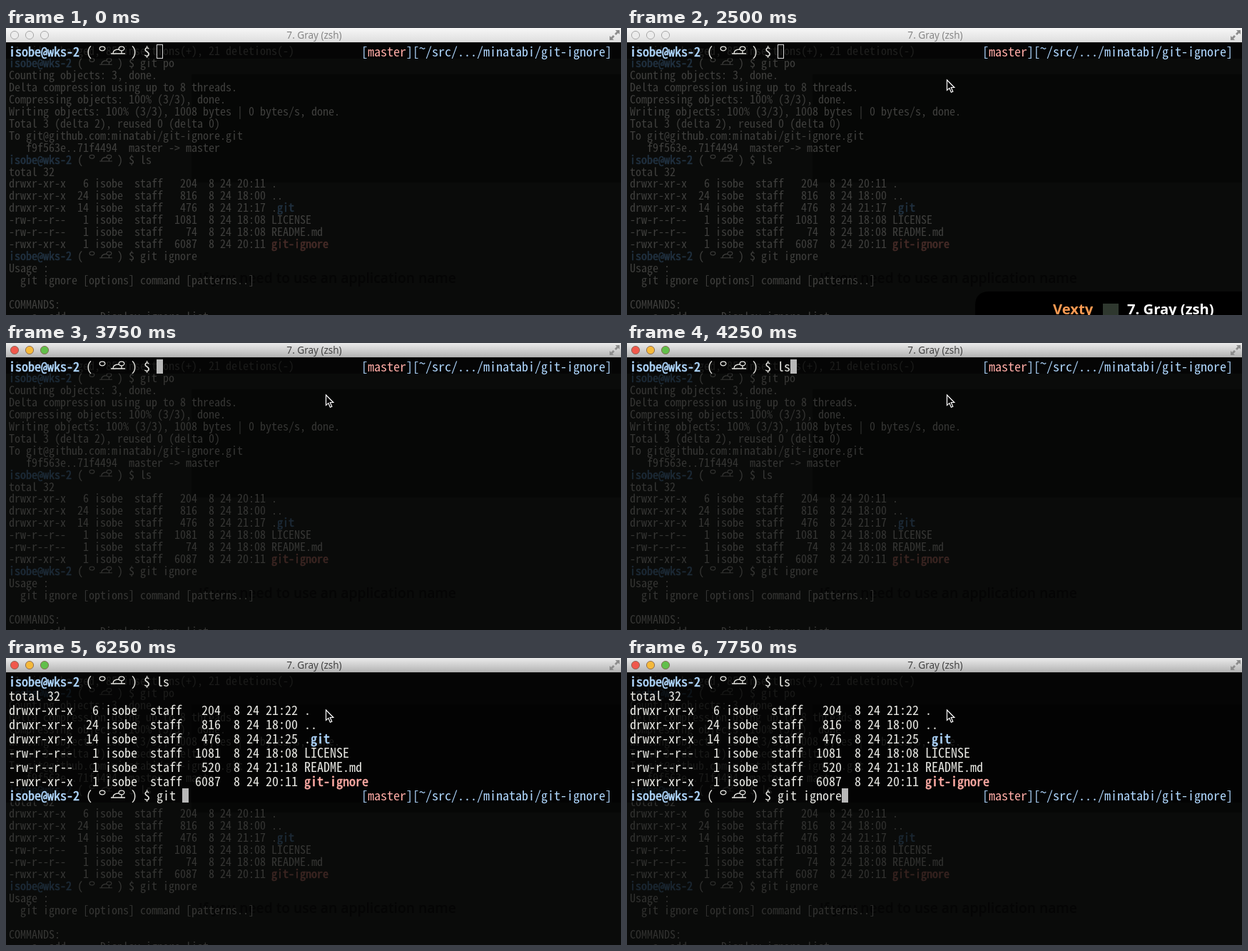
Recreate the animation shown at these times as an HTML page. Size 862 by 403 pixels, loop 8 s.

```html
<!DOCTYPE html>
<html lang="en">
<head>
<meta charset="utf-8">
<title>Terminal session</title>
<style>
html, body { margin: 0; width: 100%; height: 100%; overflow: hidden; background: #0a0b0a; }
svg { display: block; width: 100vw; height: 100vh; }
text { white-space: pre; font-variant-ligatures: none; }
.ui { font-family: "Open Sans", "Noto Sans", sans-serif; }
</style>
</head>
<body>
<svg id="stage" viewBox="0 0 862 403" preserveAspectRatio="none">
  <defs>
    <linearGradient id="barOff" x2="0" y2="1">
      <stop stop-color="#f7f7f7"/><stop offset="1" stop-color="#dedede"/>
    </linearGradient>
    <linearGradient id="barOn" x2="0" y2="1">
      <stop stop-color="#ebebeb"/><stop offset="1" stop-color="#b3b3b3"/>
    </linearGradient>
    <linearGradient id="pillFill" x2="0" y2="1">
      <stop stop-color="#6f9be0"/><stop offset="1" stop-color="#1c49a0"/>
    </linearGradient>
  </defs>
  <rect width="862" height="403" fill="#0a0b0a"/>
  <rect x="260" y="65" width="602" height="152" fill="#060706"/>
  <text class="ui" x="270" y="358" font-size="19.3" font-weight="600" fill="#050505">If you need to use an application name</text>
  <g id="back"></g>
  <rect id="shade" y="21" width="862" height="22" fill="#000" opacity=".5"/>
  <g id="front"></g>
  <g id="bar">
    <rect id="barFill" width="862" height="20"/>
    <path d="M0 20.5H862" stroke="#1a1a1a"/>
    <g id="lights"></g>
    <text id="title" class="ui" x="432" y="14.8" font-size="13.6" text-anchor="middle">7. Gray (zsh)</text>
    <path d="M854 3H860V9L858 7L855 10L853 8L856 5ZM852 17H846V11L848 13L851 10L853 12L850 15Z" fill="#8c8c8c"/>
  </g>
  <g id="switcher" class="ui" font-size="20.2" font-weight="700">
    <path d="M488 403V390Q488 370 508 370H862V403Z" fill="#000"/>
    <rect id="pill" x="659.5" y="384" width="170.5" height="30" rx="8" fill="url(#pillFill)" stroke="#fff" stroke-width="2"/>
    <text x="597" y="401.5" fill="#f79a52">Vexty</text>
    <rect x="667" y="387" width="22" height="22" fill="#2f382f"/>
    <text x="701" y="401.5" fill="#fff">7. Gray (zsh)</text>
  </g>
  <path id="pointer" d="M0 0V14.5L3.4 11.4L5.9 17.2L8.3 16.2L5.8 10.5H10.3Z" fill="#000" stroke="#fff" stroke-width="1.2"/>
</svg>
<script>
const NS = "http://www.w3.org/2000/svg";
const MONO = '"Noto Sans Mono CJK JP", "Noto Sans Mono", "DejaVu Sans Mono", monospace';
const USER = "isobe", HOST = "wks-2", OWNER = "minatabi";
const LOOP = 8000;
const $ = id => document.getElementById(id);
const pen = document.createElement("canvas").getContext("2d");

function add(parent, tag, attrs, content) {
  const node = document.createElementNS(NS, tag);
  for (const key in attrs) node.setAttribute(key, attrs[key]);
  if (content !== undefined) node.textContent = content;
  return parent.appendChild(node);
}

function show(node, on) {
  node.setAttribute("visibility", on ? "visible" : "hidden");
}

// A text grid: half-width cells of a font twice as tall as a cell is wide.
function makeGrid(cell, pitch, base, colors) {
  const size = cell * 2;
  pen.font = `${size}px ${MONO}`;
  const gap = cell - pen.measureText("0".repeat(20)).width / 20;

  function write(g, row, col, str, color = "text", rise = 0) {
    return add(g, "text", {
      x: 4 + col * cell, y: base + row * pitch - rise, fill: colors[color],
      "font-family": MONO, "font-size": size, "letter-spacing": gap
    }, str);
  }

  // Bold is the regular weight thickened by an outline.
  function bold(g, row, col, str, color) {
    const node = write(g, row, col, str, color);
    node.setAttribute("stroke", colors[color]);
    node.setAttribute("stroke-width", 0.6);
  }

  function prompt(g, row, command = "") {
    bold(g, row, 0, `${USER}@${HOST}`, "blue");
    write(g, row, 12, "(");
    const face = add(g, "g", {
      transform: `translate(4 ${base + row * pitch}) scale(${cell / 9})`,
      fill: "none", stroke: colors.text, "stroke-width": 1.3
    });
    add(face, "ellipse", { cx: 131, cy: -11, rx: 3.8, ry: 2.8 });
    add(face, "ellipse", { cx: 158, cy: -11, rx: 3.8, ry: 2.8 });
    add(face, "path", { d: "M143 -4H163M146 -4Q146 -10 154 -10M158 -4V-8" });
    write(g, row, 19, ")");
    write(g, row, 21, "$");
    return write(g, row, 23, command);
  }

  function listing(g, row, files) {
    write(g, row, 0, "total 32");
    files.forEach(([mode, links, bytes, time, name, color], i) => {
      const r = row + 1 + i;
      const info = mode + String(links).padStart(4) + ` ${USER}  staff` + String(bytes).padStart(6);
      write(g, r, 0, `${info}  8 24 ${time}`);
      if (name === ".git") {
        write(g, r, 46, ".");
        bold(g, r, 47, "git", color);
      } else if (color) bold(g, r, 46, name, color);
      else write(g, r, 46, name);
    });
  }
  return { write, prompt, listing };
}

const DIR = "drwxr-xr-x", DOC = "-rw-r--r--", EXE = "-rwxr-xr-x";
const files = (top, git, readme, readmeTime) => [
  [DIR, 6, 204, top, "."],
  [DIR, 24, 816, "18:00", ".."],
  [DIR, 14, 476, git, ".git", "blue"],
  [DOC, 1, 1081, "18:08", "LICENSE"],
  [DOC, 1, readme, readmeTime, "README.md"],
  [EXE, 1, 6087, "20:11", "git-ignore", "pink"]
];

// Older session showing through the window.
const back = $("back");
const dim = makeGrid(8, 16.97, 37.8, { text: "#3f3f3d", blue: "#20303f", pink: "#452b27" });
dim.write(back, 0, 0, " 1 file changed, 85 insertions(+), 21 deletions(-)");
dim.prompt(back, 1, "git po");
[
  "Counting objects: 3, done.",
  "Delta compression using up to 8 threads.",
  "Compressing objects: 100% (3/3), done.",
  "Writing objects: 100% (3/3), 1008 bytes | 0 bytes/s, done.",
  "Total 3 (delta 2), reused 0 (delta 0)",
  `To git@github.com:${OWNER}/git-ignore.git`,
  "   f9f563e..71f4494  master -> master"
].forEach((line, i) => dim.write(back, 2 + i, 0, line));
dim.prompt(back, 9, "ls");
dim.listing(back, 10, files("20:11", "21:17", 74, "18:08"));
dim.prompt(back, 17, "git ignore");
dim.write(back, 18, 0, "Usage :");
dim.write(back, 19, 0, "  git ignore [options] command [patterns..]");
dim.write(back, 21, 0, "COMMANDS:");
dim.write(back, 22, 0, "    a, add      Display ignore list");

// Live session.
const front = $("front");
const lit = makeGrid(9, 20, 40, { text: "#e9e9e4", blue: "#b0d8ff", pink: "#ffaca6" });
const cursor = add(front, "rect", {});
const first = lit.prompt(front, 0);
const result = add(front, "g", {});
lit.listing(result, 1, files("21:22", "21:25", 520, "21:18"));
const second = lit.prompt(result, 8);
const side = add(front, "g", {});
lit.write(side, 0, 55, "[", "blue");
lit.write(side, 0, 56, "master", "pink");
lit.write(side, 0, 62, "][", "blue");
lit.write(side, 0, 64, "~", "blue", 5);
lit.write(side, 0, 65, `/src/.../${OWNER}/git-ignore]`, "blue");

const lights = [12, 33, 54].map(cx => add($("lights"), "circle", { cx, cy: 10, r: 5.6 }));
const lightColors = ["#f0584c", "#f4b93c", "#62bf4b"];

// Typed length at time t, from [time, length] steps.
const typed = (t, steps) => steps.reduce((n, [at, len]) => t >= at ? len : n, 0);

function render(t) {
  const active = t >= 3750, listed = t >= 4750;
  const row = listed ? 8 : 0;
  const a = typed(t, [[4000, 1], [4250, 2]]);
  const b = typed(t, [[6250, 4], [7000, 5], [7250, 6], [7500, 7], [7750, 10]]);
  first.textContent = "ls".slice(0, a);
  second.textContent = "git ignore".slice(0, b);
  show(result, listed);
  side.setAttribute("transform", `translate(-1 ${row * 20})`);

  const inset = active ? 0 : 0.5;
  const box = {
    x: 211 + (listed ? b : a) * 9 + inset, y: 23 + row * 20 + inset,
    width: active ? 9 : 8, height: 20 - inset * 2,
    fill: active ? "#b8b8b8" : "none", stroke: active ? "none" : "#d8d8d8"
  };
  for (const key in box) cursor.setAttribute(key, box[key]);

  $("shade").setAttribute("height", listed ? 182 : 22);
  back.setAttribute("opacity", t >= 7500 ? 0.74 : active ? 0.82 : 1);

  $("barFill").setAttribute("fill", active ? "url(#barOn)" : "url(#barOff)");
  $("title").setAttribute("fill", active ? "#3a3a3a" : "#808080");
  lights.forEach((light, i) => {
    light.setAttribute("fill", active ? lightColors[i] : "#ececec");
    light.setAttribute("stroke", active ? "#7d5a4a" : "#a9a9a9");
    light.setAttribute("stroke-width", active ? 0.8 : 1);
  });

  const switching = t >= 2500 && t < 3750;
  show($("switcher"), switching);
  show($("pill"), switching && t >= 3500);

  show($("pointer"), t >= 500);
  $("pointer").setAttribute("transform", t < 750 ? "translate(577.5 40)" : "translate(448.5 73)");
}

function tick() {
  render(performance.now() % LOOP);
  requestAnimationFrame(tick);
}
tick();
</script>
</body>
</html>
```
